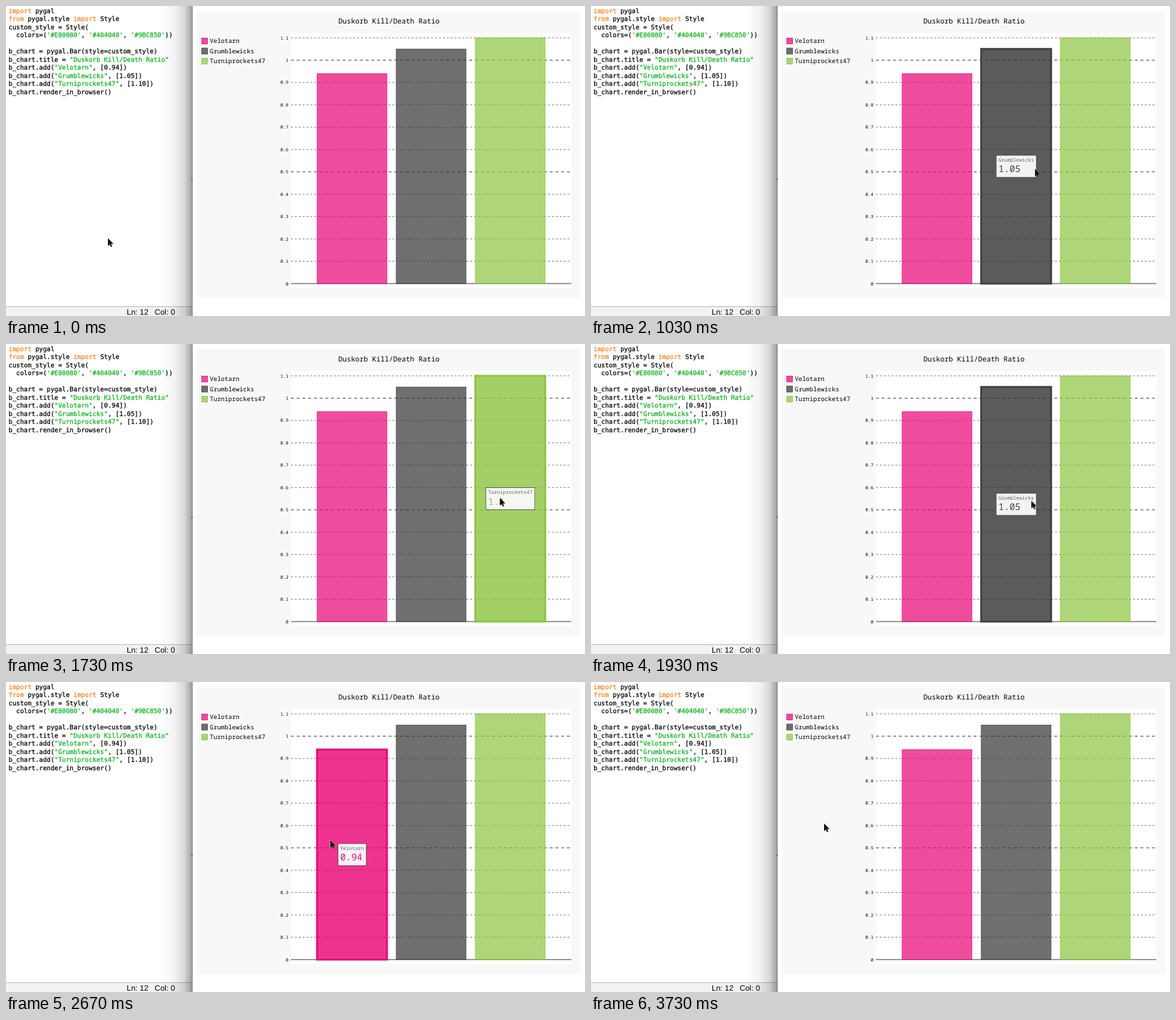
Write an HTML page that moves like this. It is 892x478 px and loops after 5.13 s.

```html
<!DOCTYPE html>
<html lang="en">
<head>
<meta charset="utf-8">
<title>Bar chart demo</title>
<style>
  html, body { margin: 0; width: 100%; height: 100%; overflow: hidden; background: #fff; }
  body { position: relative; text-rendering: geometricPrecision; }
  svg { position: absolute; left: 0; top: 0; display: block; }
  pre {
    position: absolute; left: 4px; top: 2.5px; margin: 0; color: #000;
    font: 9.77px/12.55px "DejaVu Sans Mono", monospace;
    -webkit-text-stroke: .25px;
  }
  pre b { font-weight: normal; color: #f5821f; }
  pre i { font-style: normal; color: #0cae1e; }

  .chart text { font-family: "Noto Sans Mono", monospace; }
  .title { font-size: 10.85px; text-anchor: middle; }
  .legend { font-size: 9.5px; }
  .axis { font-size: 6.77px; text-anchor: end; }
  .status { font: 12px "Liberation Sans", Arial, sans-serif; }
  .tip-name { font-size: 7.6px; fill: #666; }
  .tip-value { font-size: 14.2px; }
  .guide { stroke: #000; stroke-width: .85; stroke-opacity: .6; stroke-dasharray: 3 3; }
  .guide.major { stroke-opacity: .9; stroke-dasharray: 4.43 4.43; }
  .guide.zero { stroke-opacity: .8; stroke-width: 1; stroke-dasharray: none; }

  .bar { fill-opacity: .7; stroke-width: .74; }
  .bar, .tip { animation: 5130ms step-end infinite; }
  .tip { opacity: 0; }
  #bar0 { animation-name: hover0; }
  #bar1 { animation-name: hover1; }
  #bar2 { animation-name: hover2; }
  #tip0 { animation-name: show0; }
  #tip1 { animation-name: show1; }
  #tip2 { animation-name: show2; }

  @keyframes hover0 {
    0%, 16.24%, 53.02%, 100% { fill-opacity: .7; stroke-width: .74; }
    8.95%, 44.83% { fill-opacity: .8; stroke-width: 3; }
  }
  @keyframes hover1 {
    0%, 26.47%, 44.83%, 100% { fill-opacity: .7; stroke-width: .74; }
    16.78%, 36.18% { fill-opacity: .8; stroke-width: 3; }
  }
  @keyframes hover2 {
    0%, 35.52%, 100% { fill-opacity: .7; stroke-width: .74; }
    27.02% { fill-opacity: .8; stroke-width: 3; }
  }
  @keyframes show0 {
    0%, 16.78%, 72.7%, 100% { opacity: 0; }
    8.95%, 43.66% { opacity: 1; }
  }
  @keyframes show1 {
    0%, 27.02%, 43.66%, 100% { opacity: 0; }
    16.78%, 36.18% { opacity: 1; }
  }
  @keyframes show2 {
    0%, 36.18%, 100% { opacity: 0; }
    27.02% { opacity: 1; }
  }

  #cursor { animation: point 5130ms linear infinite; }
  @keyframes point {
    0% { transform: translate(157px, 358px); }
    3.7% { transform: translate(157px, 358px); animation-timing-function: ease-in-out; }
    11.1%, 15.01% { transform: translate(556px, 250px); }
    20.07% { transform: translate(684px, 251px); }
    24.6% { transform: translate(684px, 251px); animation-timing-function: ease-in-out; }
    29.23%, 33.73% { transform: translate(761px, 237px); }
    38.98%, 42.2% { transform: translate(650px, 243px); }
    44.24%, 44.83% { transform: translate(514px, 244px); animation-timing-function: ease-out; }
    47.36% { transform: translate(500px, 244px); }
    51.9% { transform: translate(500px, 244px); animation-timing-function: ease-in-out; }
    56.52%, 100% { transform: translate(359px, 218px); }
  }
</style>
</head>
<body>
<svg width="892" height="478" viewBox="0 0 892 478">
  <defs>
    <linearGradient id="shade">
      <stop offset="0" stop-color="#000" stop-opacity="0"/>
      <stop offset=".45" stop-color="#000" stop-opacity=".05"/>
      <stop offset=".75" stop-color="#000" stop-opacity=".15"/>
      <stop offset="1" stop-color="#000" stop-opacity=".38"/>
    </linearGradient>
  </defs>
  <rect y="464" width="287" height="14" fill="#f2f2f2"/>
  <rect y="463" width="287" height="1" fill="#bbb"/>
  <rect x="237" width="50" height="478" fill="url(#shade)"/>
  <rect x="286.5" width="1" height="478" fill="#777"/>
  <circle cx="286.5" cy="267" r="1" fill="#444"/>
  <text class="status" x="186" y="476">Ln: 12</text>
  <text class="status" x="229" y="476">Col: 0</text>

  <g class="chart">
    <rect x="294" y="8" width="591" height="442" fill="#f8f8f8"/>
    <rect x="439" y="42" width="432" height="393" fill="#fff"/>
    <text class="title" x="590" y="27">Duskorb Kill/Death Ratio</text>
    <g id="grid"></g>
    <g id="bars"></g>
    <g id="tips"></g>
  </g>
</svg>

<pre><b>import</b> pygal
<b>from</b> pygal.style <b>import</b> Style
custom_style = Style(
  colors=(<i>'#E80080'</i>, <i>'#404040'</i>, <i>'#9BC850'</i>))

b_chart = pygal.Bar(style=custom_style)
b_chart.title = <i>"Duskorb Kill/Death Ratio"</i>
b_chart.add(<i>"Velotarn"</i>, [0.94])
b_chart.add(<i>"Grumblewicks"</i>, [1.05])
b_chart.add(<i>"Turniprockets47"</i>, [1.10])
b_chart.render_in_browser()</pre>

<svg width="892" height="478" viewBox="0 0 892 478">
  <g id="cursor">
    <path d="M.8 1.2V13L3.6 10.4L5.4 14.4L7.4 13.5L5.6 9.7H9.3Z" fill="#000" opacity=".2"/>
    <path d="M0 0V12L2.8 9.5L4.5 13.4L6.5 12.5L4.8 8.7H8.5Z" fill="#111" stroke="#fff" stroke-width=".8" stroke-linejoin="round" paint-order="stroke"/>
  </g>
</svg>

<script>
  const BASE = 428, STEP = 34.45;
  const series = [
    { name: 'Velotarn', value: 0.94, color: '#ea0174', edge: '#e01078' },
    { name: 'Grumblewicks', value: 1.05, color: '#333333', edge: '#404040' },
    { name: 'Turniprockets47', value: 1.1, color: '#8ec341', edge: '#8ec341' }
  ];
  const yOf = value => BASE - value * 10 * STEP;
  const fill = (id, html) => { document.getElementById(id).innerHTML = html; };

  let grid = '';
  for (let i = 0; i <= 11; i++) {
    const y = yOf(i / 10);
    const kind = i === 0 ? 'zero' : i % 5 === 0 ? 'major' : '';
    grid += `<line class="guide ${kind}" x1="439" x2="871" y1="${y}" y2="${y}"/>
      <text class="axis" x="435" y="${y + 2.5}">${i / 10}</text>`;
  }
  fill('grid', grid);

  let bars = '', tips = '';
  series.forEach(({ name, value, color, edge }, i) => {
    const x = 479.2 + 121.9 * i, y = yOf(value), row = 54 + 15.5 * i;
    const width = name.length * 4.56 + 7.2;
    const left = x + 54 - width / 2, top = (y + BASE) / 2 - 17;
    bars += `<rect x="301.4" y="${row - 4.6}" width="9.2" height="9.2" fill="${color}" fill-opacity=".7" stroke="${edge}" stroke-width=".74"/>
      <text class="legend" x="314" y="${row + 3.4}">${name}</text>
      <rect class="bar" id="bar${i}" x="${x}" y="${y}" width="107.7" height="${BASE - y}" fill="${color}" stroke="${edge}"/>`;
    tips += `<g class="tip" id="tip${i}" transform="translate(${left} ${top})">
      <rect width="${width}" height="34" fill="#f8f8f8" fill-opacity=".97" stroke="#333" stroke-width=".74"/>
      <text class="tip-name" x="3.6" y="9.6">${name}</text>
      <text class="tip-value" x="3.6" y="26.2" fill="${edge}">${value}</text></g>`;
  });
  fill('bars', bars);
  fill('tips', tips);
</script>
</body>
</html>
```
